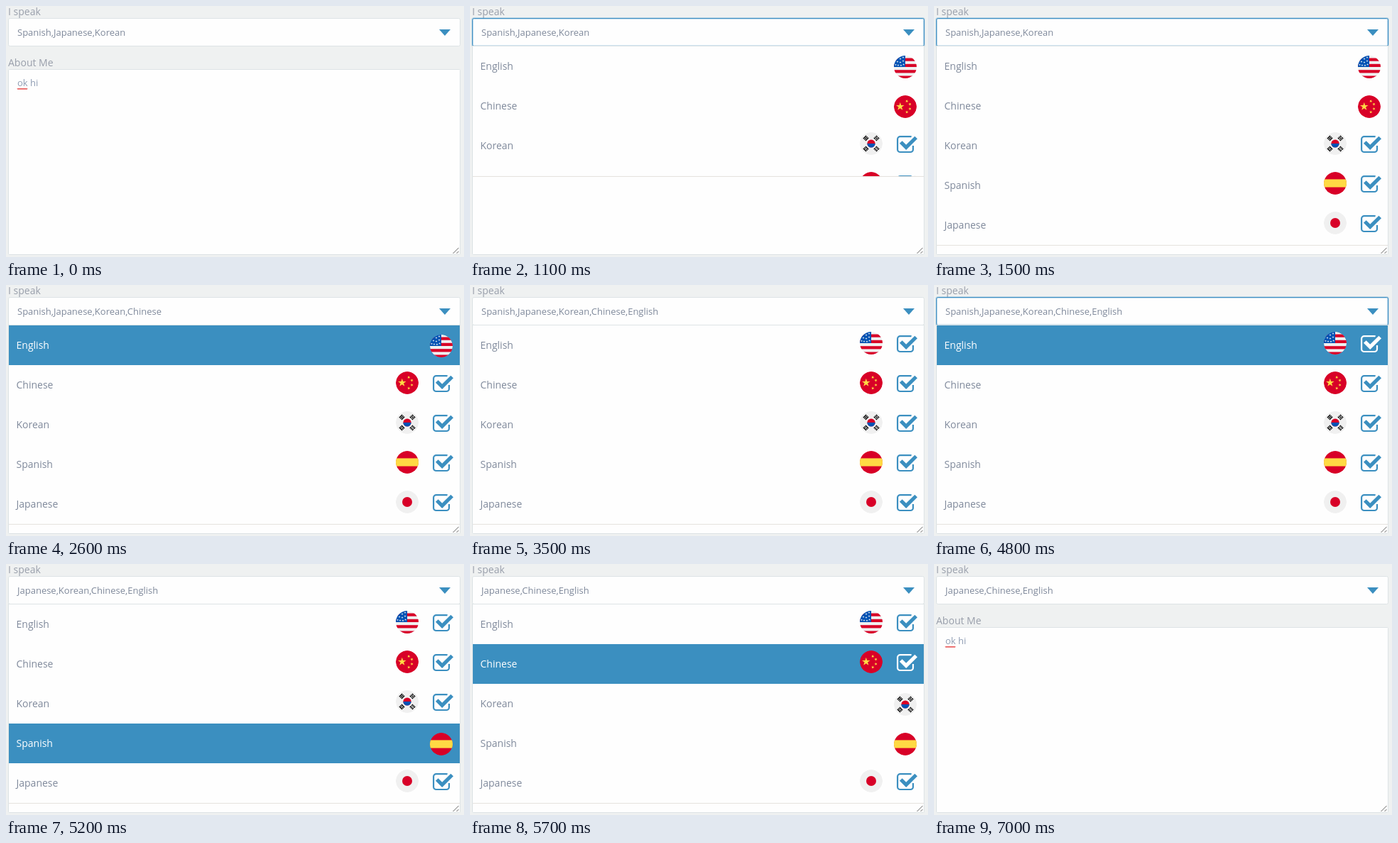
Write an HTML page that moves like this. It is 645x354 px and loops after 8 s.

```html
<!DOCTYPE html>
<html lang="en">
<head>
<meta charset="utf-8">
<title>Language picker</title>
<style>
html, body { margin: 0; width: 100%; height: 100%; overflow: hidden; background: #eff1f1; }
svg { display: block; }
text { font: 14px "Open Sans", sans-serif; fill: #7f899b; }
.label { fill: #999fab; }
.small { font-size: 13px; }
.box { fill: #fefefe; stroke: #dde3e5; }
.check { fill: none; stroke: #3b8fc0; }
.bar { fill: none; }
.on .bar { fill: #3b8fc0; }
.on text { fill: #fff; }
.on .check { stroke: #fff; }
</style>
</head>
<body>
<svg id="stage" width="645" height="354" viewBox="0 0 645 354"></svg>
<script>
const RED = '#d80027', BLUE = '#0052b4', GOLD = '#ffda44', PALE = '#f0f0f0';
const LOOP = 8000, STEP = 100, ROW = 56, TOP = 57, SLIDE = 200;

const rect = (x, y, w, h, fill) => `<rect x="${x}" y="${y}" width="${w}" height="${h}" fill="${fill}"/>`;
const disc = (r, fill) => `<circle cx="16" cy="16" r="${r}" fill="${fill}"/>`;

function star(cx, cy, r, fill, turn = 0) {
  const points = Array.from({ length: 10 }, (_, i) => {
    const a = turn + i * Math.PI / 5, d = i % 2 ? r * .382 : r;
    return [cx + d * Math.sin(a), cy - d * Math.cos(a)].map(v => v.toFixed(2));
  });
  return `<polygon points="${points.join(' ')}" fill="${fill}"/>`;
}

// Three bars across the diagonal; a 0 in the pattern is a broken bar.
function trigram(x, y, angle, pattern) {
  const bars = [...pattern].map((whole, i) => {
    const top = (i - 1) * 2.1 - .7;
    return whole === '1' ? rect(-3, top, 6, 1.4, '#000')
      : rect(-3, top, 2.6, 1.4, '#000') + rect(.4, top, 2.6, 1.4, '#000');
  });
  return `<g transform="translate(${x} ${y}) rotate(${angle})">${bars.join('')}</g>`;
}

const flags = {
  English: () => disc(16, PALE)
    + [3.5, 11.8, 20.2, 28.5].map(y => rect(0, y, 32, 4.2, RED)).join('')
    + rect(0, 0, 16, 16, BLUE)
    + [[13, 2.5], [9, 4.5], [13, 7.5], [5, 8.5], [9, 9.5], [2.5, 13], [6, 13.5], [10, 13.8], [13.6, 12.5]]
      .map(([x, y]) => star(x, y, 1.6, PALE)).join(''),
  Chinese: () => disc(16, RED) + star(8.8, 15.9, 6.1, GOLD)
    + [[18.2, 8.2], [22.5, 12.5], [22.5, 19], [18.2, 23.6]]
      .map(([x, y], i) => star(x, y, 2.3, GOLD, .4 + i * .3)).join(''),
  Korean: () => disc(16, PALE) + disc(5.6, RED)
    + `<path d="M10.4 16a5.6 5.6 0 0 0 11.2 0z" fill="${BLUE}"/>`
    + trigram(8.5, 8.5, -45, '111') + trigram(23.5, 8.5, 45, '010')
    + trigram(8.5, 23.5, 45, '101') + trigram(23.5, 23.5, -45, '000'),
  Spanish: () => disc(16, RED) + rect(0, 10.4, 32, 11.2, GOLD),
  Japanese: () => disc(16, PALE) + disc(7, RED)
};
const names = Object.keys(flags);

// Picked languages in the order of the field: [name, picked at, dropped at].
const picks = [
  ['Spanish', 0, 5200], ['Japanese', 0, LOOP], ['Korean', 0, 5600],
  ['Chinese', 2400, LOOP], ['English', 3100, LOOP]
];
// [time, value] steps; the value holds until the next step.
const hover = [[0, -1], [1300, 0], [1500, -1], [2200, 1], [2600, 0], [3500, -1],
  [4800, 0], [4900, 2], [5000, 3], [5400, 2], [5700, 1], [5900, -1]];
const glow = [[0, 0], [1000, .5], [1100, 1], [2400, .4], [2500, 0], [4500, .5], [4600, 1],
  [5200, 0], [6400, .5], [6500, 1], [6900, .5], [7000, 0]];
const slides = [[0, 0], [980, 1], [3980, 0], [4480, 1], [6780, 0]];

const rows = names.map((name, i) => `
  <g class="row" transform="translate(0 ${TOP + i * ROW})">
    <rect class="bar" x="4" width="635" height="${ROW}"/>
    <text x="14.5" y="33">${name}</text>
    <g class="flag"><g clip-path="url(#round)">${flags[name]()}</g></g>
    <g class="check" transform="translate(601 14)">
      <path stroke-width="2.2" d="M20.6 1.5Q20 1.1 19.2 1.1H4.9a3.8 3.8 0 0 0-3.8 3.8v14.3a3.8 3.8 0 0 0 3.8 3.8h14.3a3.8 3.8 0 0 0 3.8-3.8V14"/>
      <path stroke-width="5.2" d="M5.8 9L13.2 16.4L27.2 2.5"/>
    </g>
  </g>`).join('');

const stage = document.getElementById('stage');
stage.innerHTML = `
  <clipPath id="round"><circle cx="16" cy="16" r="16"/></clipPath>
  <clipPath id="window"><rect id="opening" x="3" y="57" width="637"/></clipPath>
  <text class="label" x="3" y="13">I speak</text>
  <text class="label" x="3" y="85">About Me</text>
  <rect class="box" x="3.5" y="89.5" width="636" height="261" rx="1"/>
  <text class="small" x="16" y="113" style="fill:#8f9db3">ok hi</text>
  <path d="M16 116.2${'l1 1.4l1-1.4'.repeat(7)}" fill="none" stroke="#e01818"/>
  <path d="M629.5 349l8-8M634.5 349l3-3" stroke="#666"/>
  <rect class="box" x="3.5" y="17.5" width="636" height="39" rx="2"/>
  <g id="ring" fill="none" stroke="#3f8fc4">
    <rect x="3.5" y="17.5" width="636" height="39" rx="2" stroke-width="3" opacity=".25"/>
    <rect x="3.5" y="17.5" width="636" height="39" rx="2"/>
  </g>
  <text id="value" class="small" x="16" y="42"></text>
  <path d="M610 33h16l-8 9z" fill="#3b8fc0"/>
  <g id="menu">
    <rect id="panel" class="box" x="3.5" y="56.5" width="636"/>
    <g clip-path="url(#window)">${rows}</g>
    <path id="edge" d="M4 0H639" stroke="#e6e2de"/>
  </g>`;

const [opening, ring, value, menu, panel, edge] =
  ['opening', 'ring', 'value', 'menu', 'panel', 'edge'].map(id => document.getElementById(id));
const rowNodes = [...stage.querySelectorAll('.row')];

const stepAt = (steps, t) => steps.filter(s => s[0] <= t).pop();

function openness(t) {
  const [start, goal] = stepAt(slides, t);
  const p = (1 - Math.cos(Math.PI * Math.min(1, (t - start) / SLIDE))) / 2;
  return start === 0 ? 0 : goal ? p : 1 - p;
}

function draw() {
  const t = Math.floor(performance.now() % LOOP / STEP) * STEP;
  const picked = picks.filter(([, from, to]) => t >= from && t < to).map(p => p[0]);
  const active = stepAt(hover, t)[1];
  const open = openness(t), height = 281 * open;

  value.textContent = picked.join(',');
  ring.setAttribute('opacity', stepAt(glow, t)[1]);
  menu.style.display = open > 0 ? '' : 'none';
  panel.setAttribute('height', height);
  opening.setAttribute('height', Math.max(0, height - 1));
  edge.setAttribute('transform', `translate(0 ${56.5 + Math.round(height)})`);

  rowNodes.forEach((row, i) => {
    const on = picked.includes(names[i]);
    row.classList.toggle('on', i === active);
    row.querySelector('.flag').setAttribute('transform', on ? 'translate(549 9)' : 'translate(597 13)');
    row.querySelector('.check').style.display = on ? '' : 'none';
  });
  requestAnimationFrame(draw);
}
draw();
</script>
</body>
</html>
```
